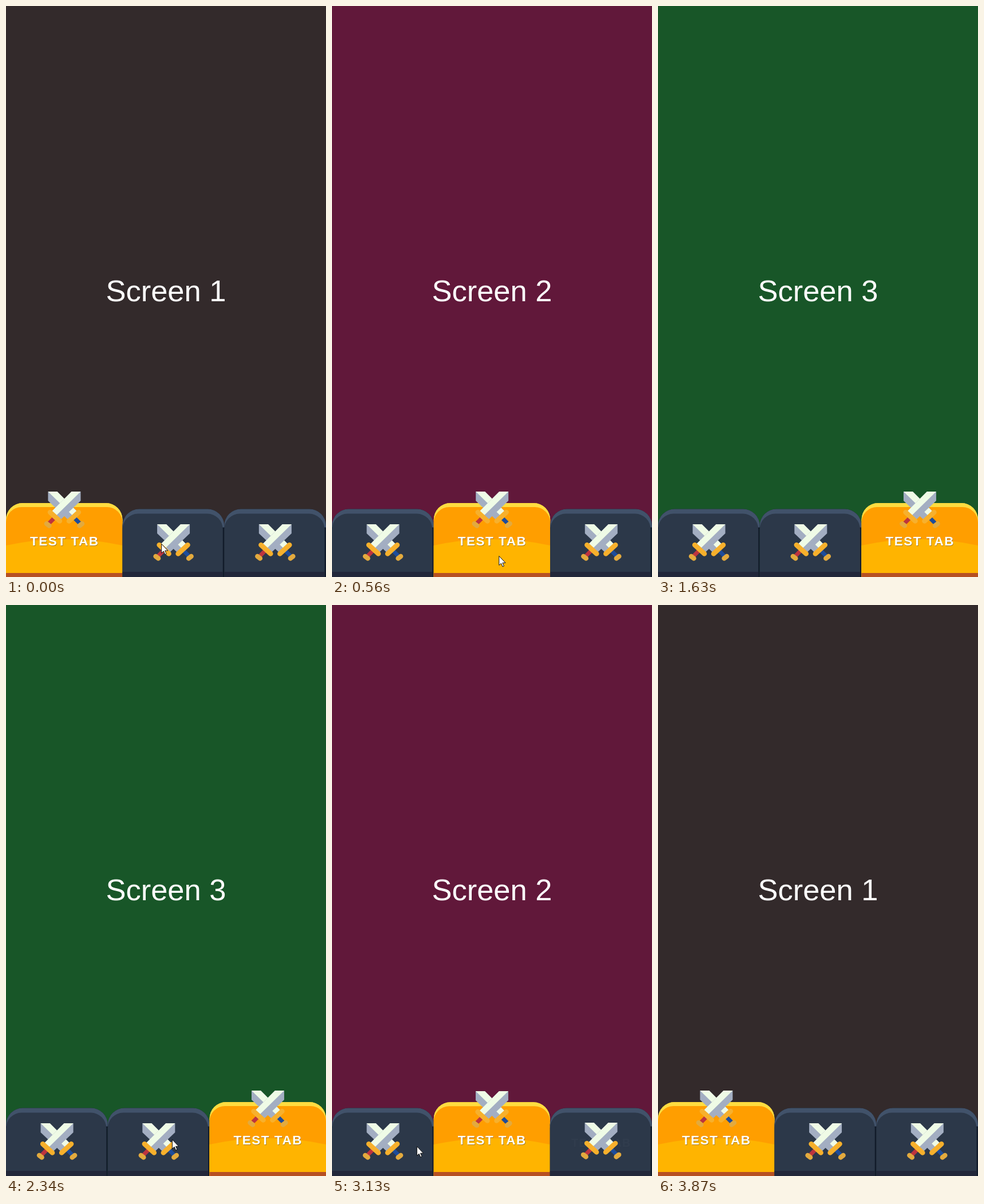
An HTML page that plays this animation: 559 px wide and 996 px high, repeating every 4000 ms.

```html
<!DOCTYPE html>
<html lang="en">
<head>
<meta charset="utf-8">
<title>Tab bar</title>
<style>
html, body { margin: 0; width: 100%; height: 100%; overflow: hidden; background: #332a2b; }
svg { display: block; width: 100vw; height: 100vh; }
text { font-family: "Liberation Sans", Arial, sans-serif; fill: #fff; text-anchor: middle; }
.title { font-size: 52.5px; }
.label { font-size: 22.5px; font-weight: bold; letter-spacing: 1.5px; }
.shade { fill: #222; opacity: .4; }
</style>
</head>
<body>
<svg id="stage" viewBox="0 0 559 996" preserveAspectRatio="none">
  <defs>
    <g id="idle"></g>
    <g id="active"></g>
    <g id="sword">
      <path d="M48 0H64V16L28 50L13 35Z" fill="#a3aec2"/>
      <path d="M48 0H64L20 43L13 35Z" fill="#effbe6"/>
      <path d="M19 45L9 55" stroke="currentColor" stroke-width="7"/>
      <g stroke-width="8.5" stroke-linecap="round">
        <path d="M10.500 36L27.500 51.500" stroke="#f7b02c"/>
        <path d="M4.500 56L9 59.500" stroke="#e3aa3e"/>
      </g>
    </g>
    <g id="swords">
      <use href="#sword" transform="translate(71 0) scale(-1 1)" color="#1d4c9b"/>
      <use href="#sword" color="#bd343e"/>
    </g>
  </defs>
  <rect id="screen" width="559" height="996"/>
  <text id="title" class="title" x="279.5" y="515.3"></text>
  <g id="tabs"></g>
  <path id="cursor" d="M.5 .5V16.500L4.200 13.200L6.700 19L9.100 18L6.600 12.300H11.700Z" fill="#fff" stroke="#111"/>
</svg>
<script>
const LOOP = 4000, EASE_MS = 280, STAGE_W = 559, BOTTOM = 996;
const ACTIVE_W = 203.5, IDLE_W = (STAGE_W - ACTIVE_W) / 2;
const ACTIVE_H = 129, IDLE_H = 118.4;
const COLORS = ["#332a2b", "#61183a", "#185628"];

// [time, selected tab]
const clicks = [[220, 1], [1205, 2], [2925, 1], [3570, 0]];

// Visible cursor runs as [time, x, y]
const runs = [
  [[0, 271, 938], [30, 275, 930], [230, 275, 930], [560, 291, 959], [1210, 492, 934], [1450, 486, 996]],
  [[1860, 308, 988], [2010, 290, 932], [2340, 290, 932], [2520, 275, 931], [2690, 275, 931],
   [2920, 267, 924], [3130, 148, 944], [3570, 92, 936], [3745, 4, 791]]
];

const $ = id => document.getElementById(id);
const mix = (a, b, k) => a + (b - a) * k;
const clamp = k => Math.max(0, Math.min(1, k));
const easeOut = k => 1 - (1 - clamp(k)) ** 3;

function make(tag, parent, attrs) {
  const el = document.createElementNS("http://www.w3.org/2000/svg", tag);
  for (const k in attrs) el.setAttribute(k, attrs[k]);
  return parent.appendChild(el);
}

// Box with rounded top corners
const dome = (w, top, h, r) =>
  `M0 ${h}V${top + r}A${r} ${r} 0 0 1 ${r} ${top}H${w - r}A${r} ${r} 0 0 1 ${w} ${top + r}V${h}Z`;

function buildTab(id, w, h, rim, strip, gap, [edge, light, body, base]) {
  const g = $(id), inner = w - gap;
  make("path", g, { d: dome(w, 0, h, 29), fill: edge });
  make("path", g, { d: dome(w, 0, 32, 29), fill: light });
  make("path", g, { d: dome(inner, rim, h, 27), fill: body });
  if (!gap) make("path", g, { d: `M0 ${h}V74Q${w / 2} 52 ${w} 74V${h}Z`, fill: "#ffb400" });
  make("rect", g, { y: h - strip, width: inner, height: strip, fill: base });
}
buildTab("idle", IDLE_W, IDLE_H, 8, 9, 2.5, ["#121b2a", "#41526a", "#2c3849", "#22273a"]);
buildTab("active", ACTIVE_W, ACTIVE_H, 7, 7, 0, ["#ffdc40", "#ffdc40", "#ff9e00", "#b65022"]);

const tabs = COLORS.map(() => {
  const g = make("g", $("tabs"), {});
  const idle = make("use", g, { href: "#idle" });
  const active = make("use", g, { href: "#active" });
  const label = make("g", g, {});
  make("text", label, { class: "label shade", x: 1.2, y: 8.6 }).textContent = "TEST TAB";
  make("text", label, { class: "label", x: 0.5, y: 7.7 }).textContent = "TEST TAB";
  return { idle, active, label, icon: make("use", g, { href: "#swords" }) };
});

function selection(t) {
  let prev = 0, cur = 0, start = -EASE_MS;
  for (const [at, tab] of clicks) {
    if (t >= at) { prev = cur; cur = tab; start = at; }
  }
  return { prev, cur, p: easeOut((t - start) / EASE_MS) };
}

function cursorAt(t) {
  for (const run of runs) {
    for (let i = 1; i < run.length; i++) {
      const [t0, x0, y0] = run[i - 1], [t1, x1, y1] = run[i];
      if (t >= t0 && t < t1) {
        const k = (t - t0) / (t1 - t0);
        return [mix(x0, x1, k), mix(y0, y1, k)];
      }
    }
  }
  return null;
}

function drawTab(tab, x, w, s, on) {
  const h = mix(IDLE_H, ACTIVE_H, s), mid = x + w / 2;
  const place = (el, bw, bh) =>
    el.setAttribute("transform", `translate(${x} ${BOTTOM - h}) scale(${w / bw} ${h / bh})`);
  place(tab.idle, IDLE_W, IDLE_H);
  place(tab.active, ACTIVE_W, ACTIVE_H);
  tab.idle.style.display = on ? "none" : "";
  tab.active.style.display = on ? "" : "none";
  tab.label.setAttribute("transform",
    `translate(${mid} ${mix(938.3, 933, s)}) scale(${mix(0.865, 1, s)})`);
  tab.label.setAttribute("opacity", on ? clamp(s * 3.5) : s);
  tab.icon.setAttribute("transform", `translate(${mid - 35.3} ${mix(904, 847, s)})`);
}

function draw(t) {
  const { prev, cur, p } = selection(t);
  $("screen").setAttribute("fill", COLORS[cur]);
  $("title").textContent = "Screen " + (cur + 1);

  let x = 0;
  tabs.forEach((tab, i) => {
    const s = mix(+(i === prev), +(i === cur), p);
    const w = mix(IDLE_W, ACTIVE_W, s);
    drawTab(tab, x, w, s, i === cur);
    x += w;
  });

  const pos = cursorAt(t);
  $("cursor").style.display = pos ? "" : "none";
  if (pos) $("cursor").setAttribute("transform", `translate(${pos[0]} ${pos[1]})`);
}

const begin = performance.now();
function tick() {
  draw((performance.now() - begin) % LOOP);
  requestAnimationFrame(tick);
}
tick();
</script>
</body>
</html>
```
